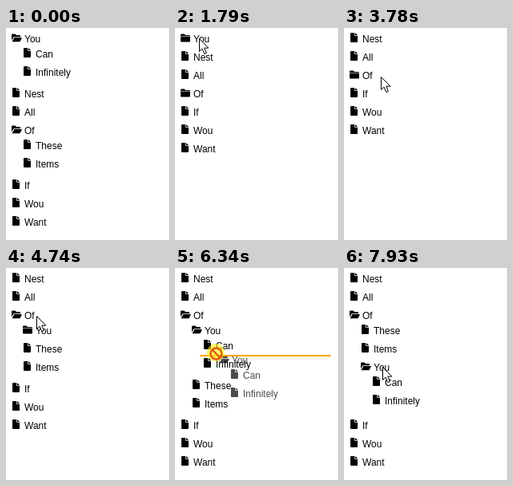
An HTML page that plays this animation: 204 px wide and 266 px high, repeating every 8 s.

```html
<!DOCTYPE html>
<html lang="en">
<head>
<meta charset="utf-8">
<title>Nested list</title>
<style>
  html, body { margin: 0; width: 100%; height: 100%; overflow: hidden; background: #fff; }
  svg { display: block; width: 100vw; height: 100vh; }
  text { font: 12px "Liberation Sans", Arial, sans-serif; }
</style>
</head>
<body>
<svg id="stage" viewBox="0 0 204 266"></svg>
<script>
const LOOP = 8000, ROW = 23, INDENT = 14, TOP = 13;
const stage = document.getElementById('stage');

// Press and release time of every click and drag; the tree changes on release.
const acts = {
  closeOf: [680, 920],
  closeYou: [1630, 1790],
  nest: [2590, 3460],
  openOf: [4660, 4740],
  openYou: [5300, 5380],
  sort: [6180, 7450]
};
const done = (t, act) => t >= acts[act][1];
const held = (t, act) => t >= acts[act][0] && !done(t, act);

// Tree -------------------------------------------------------------
const files = names => names.split(' ').map(name => ({ name }));
const folder = (name, open, kids) => ({ name, open, kids });

const youAt = t =>
  folder('You', !done(t, 'closeYou') || done(t, 'openYou'), files('Can Infinitely'));

function treeAt(t) {
  const you = youAt(t), nested = done(t, 'nest');
  const kids = files('These Items');
  if (done(t, 'sort')) kids.push(you);
  else if (nested) kids.unshift(you);
  const of = folder('Of', !done(t, 'closeOf') || done(t, 'openOf'), kids);
  return [...(nested ? [] : [you]), ...files('Nest All'), of, ...files('If Wou Want')];
}

function layout(nodes, y, depth = 0, rows = []) {
  for (const node of nodes) {
    rows.push({ node, y, depth });
    y += ROW;
    if (node.open) y = layout(node.kids, y - 4, depth + 1, rows).end + 4;
  }
  rows.end = y;
  return rows;
}

const rowsAt = t => layout(treeAt(t), TOP);

// Pointer ----------------------------------------------------------
// Each move ends (dx, dy) from the start of a row's label; bend bows its path.
const move = (from, to, item, [dx, dy], bend = [0, 0]) => {
  const row = rowsAt(from).find(r => r.node.name === item);
  return { from, to, bend, x: 23 + row.depth * INDENT + dx, y: row.y + dy };
};

const ENTER = 290;
const moves = [
  move(ENTER, 680, 'Of', [5, 0], [-60, -45]),
  move(1090, 1630, 'You', [7, 0]),
  move(2510, 2990, 'Of', [22, -1], [2, 6]),
  move(3700, 4490, 'Of', [15, 1], [4, -56]),
  move(4820, 5140, 'You', [11, -1]),
  move(5400, 6100, 'You', [11, -1], [26, 24]),
  move(6180, 6740, 'Items', [23, 8]),
  move(7610, 7930, 'You', [11, 0])
];

function pointerAt(t) {
  let x = 118, y = 214;
  for (const m of moves) {
    if (t < m.from) break;
    const p = Math.min(1, (t - m.from) / (m.to - m.from));
    const bow = Math.sin(Math.PI * p);
    x += (m.x - x) * p + m.bend[0] * bow;
    y += (m.y - y) * p + m.bend[1] * bow;
  }
  return [Math.round(x), Math.round(y)];
}

// Drawing ----------------------------------------------------------
const path = (d, attrs = '') => `<path d="${d}" ${attrs}/>`;
const group = (x, y, body, attrs = '') => `<g transform="translate(${x} ${y})" ${attrs}>${body}</g>`;

const icons = {
  file: path('M2-7H6.2V-3.2H10V4Q10 5 9 5H2Q1 5 1 4V-6Q1-7 2-7ZM7-7 10-4H7Z'),
  closed: path('M1-5.5H4.6L6.2-4H11Q12-4 12-3V3.5Q12 4.5 11 4.5H1Q0 4.5 0 3.5V-4.5Q0-5.5 1-5.5Z') +
    path('M0-2.6H12', 'stroke="#fff" stroke-width=".6"'),
  open: path('M1-5.5H4.5L6-4H10Q11-4 11-3V-1.8H3.2Q2.4-1.8 2-1.1L0 2.5V-4.5Q0-5.5 1-5.5Z' +
    'M3.3-1H13L10.9 3.5Q10.5 4.3 9.7 4.3H.6Z')
};

function drawRow({ node, y, depth }) {
  const icon = !node.kids ? icons.file : node.open ? icons.open : icons.closed;
  return group(7 + depth * INDENT, y, `${icon}<text x="16" y="5">${node.name}</text>`);
}

const drawRows = rows => rows.map(drawRow).join('');

// Marks where the dragged item would land: above, inside or below a row.
function drawTarget(rows, y) {
  const row = rows.find(r => Math.abs(y - r.y) <= ROW / 2);
  if (!row) return '';
  const x = 3 + row.depth * INDENT, w = 200 - row.depth * 18;
  const part = (y - row.y) / ROW;
  if (Math.abs(part) < 1 / 6 && row.node.kids)
    return `<rect x="${x + 1}" y="${row.y - 10}" width="${w - 2}" height="22" fill="none" stroke="orange" stroke-width="2"/>`;
  return `<rect x="${x}" y="${row.y + (part < 0 ? -11 : 12)}" width="${w}" height="2" fill="orange"/>`;
}

const arrow = path('M0 0V16L3.6 12.6 6.3 19 8.9 18 6.3 11.6H11.4Z', 'fill="#fff" stroke="#000"');
const cursors = {
  arrow,
  copy: '<g fill="#fff" stroke="#000"><rect x="4" y="16" width="10" height="10" stroke-dasharray="2 1"/>' +
    '<rect x="10" y="20" width="8" height="8"/>' + path('M14 22V26M12 24H16') + '</g>' + arrow,
  blocked: '<g fill="none" stroke="#e2590f" stroke-width="2.4"><circle cy="1" r="7"/>' +
    path('M-5-4 5 6') + '</g>'
};

function render(t) {
  const rows = rowsAt(t);
  if (t < ENTER) return drawRows(rows);

  const [x, y] = pointerAt(t);
  const press = Object.keys(acts).find(act => held(t, act));
  const dragTime = press === 'nest' || press === 'sort' ? t - acts[press][0] - 70 : -1;
  const drag = dragTime >= 0;
  const cursor = !drag ? 'arrow' : dragTime < 170 ? 'blocked' : 'copy';

  return drawRows(rows) +
    (drag ? drawTarget(rows, y) +
      group(x - 3, y + 9, drawRows(layout([youAt(t)], 0)), 'opacity=".7"') : '') +
    (press ? `<circle cx="${x}" cy="${y}" r="11" fill="#fff000" opacity=".6"/>` : '') +
    group(x + 0.5, y + 0.5, cursors[cursor]);
}

const start = performance.now();
let last = '';
function tick() {
  const next = render((performance.now() - start) % LOOP);
  if (next !== last) stage.innerHTML = last = next;
  requestAnimationFrame(tick);
}
tick();
</script>
</body>
</html>
```
